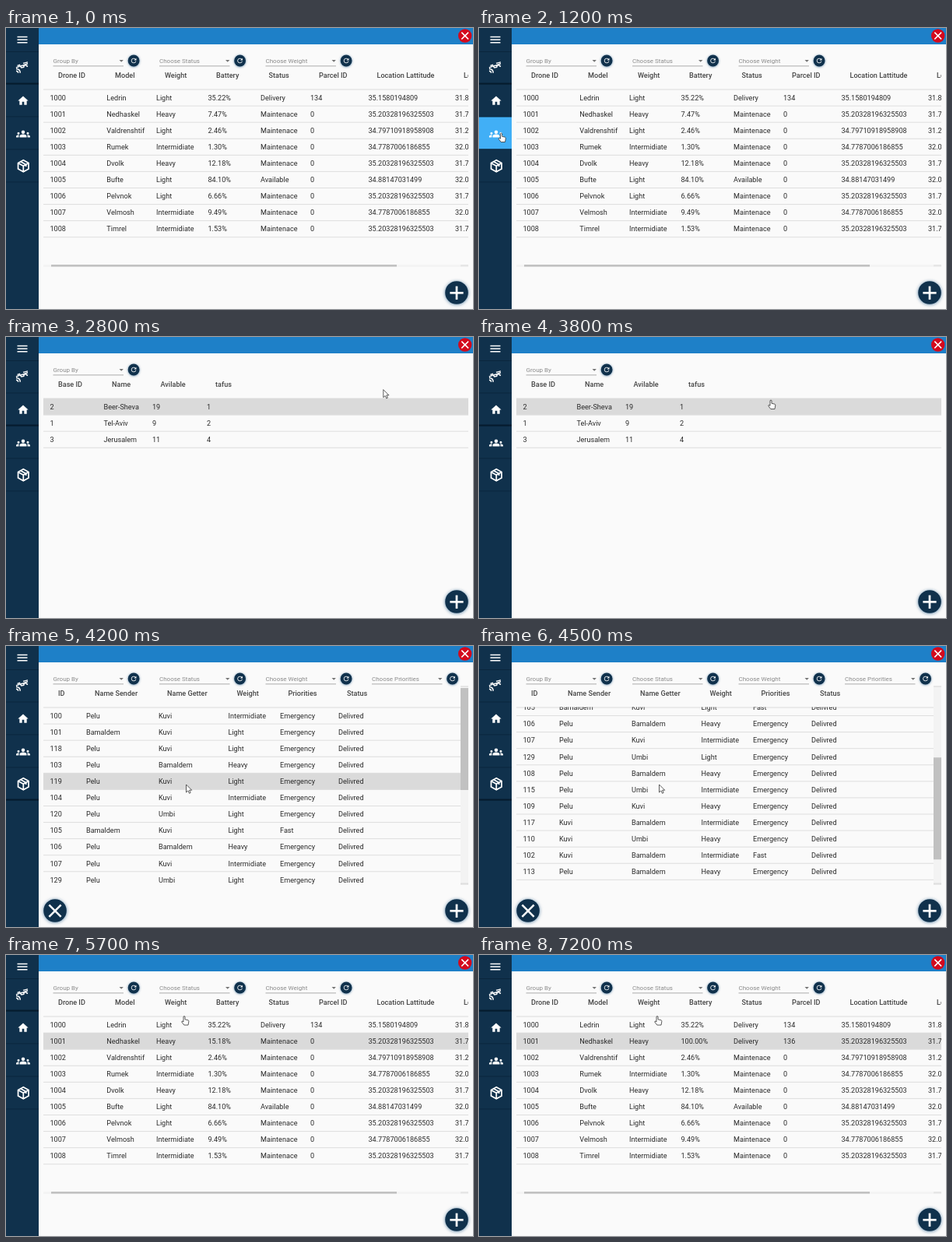
Recreate the animation shown at these times as an HTML page with a canvas. Size 600 by 361 pixels, loop 8 s.

```html
<!DOCTYPE html>
<html lang="en">
<head>
<meta charset="utf-8">
<title>Drone delivery console</title>
<style>
  html, body { margin: 0; width: 100%; height: 100%; overflow: hidden; background: #fafafa; }
  canvas { display: block; width: 100vw; height: 100vh; }
</style>
</head>
<body>
<canvas id="stage"></canvas>
<script>
const W = 600, H = 361, LOOP = 8000, TICK = 100;
const NAVY = '#10314c', BLUE = '#1e80c8', HOVER = '#41aff6', PAPER = '#fafafa';
const ROW_TOP = 79, ROW_H = 21.08;

const canvas = document.getElementById('stage');
const scale = window.devicePixelRatio || 1;
canvas.width = W * scale;
canvas.height = H * scale;
const ctx = canvas.getContext('2d');

const table = text => text.trim().split('\n').map(line => line.trim().split(/\s+/));

const pages = {
  drones: {
    item: 0, right: 594,
    filters: ['Group By', 'Choose Status', 'Choose Weight'],
    heads: ['Drone ID', 'Model', 'Weight', 'Battery', 'Status', 'Parcel ID', 'Location Lattitude', 'Location'],
    headX: [67, 140, 204, 270, 337.5, 402, 476.5, 588],
    cellX: [56.5, 129.3, 193, 259.5, 327, 391, 465.5, 577],
    rows: table(`
      1000 Ledrin Light 35.22% Delivery 134 35.1580194809 31.82
      1001 Nedhaskel Heavy 7.47% Maintenace 0 35.20328196325503 31.77
      1002 Valdrenshtif Light 2.46% Maintenace 0 34.79710918958908 31.25
      1003 Rumek Intermidiate 1.30% Maintenace 0 34.7787006186855 32.04
      1004 Dvolk Heavy 12.18% Maintenace 0 35.20328196325503 31.77
      1005 Bufte Light 84.10% Available 0 34.88147031499 32.01
      1006 Pelvnok Light 6.66% Maintenace 0 35.20328196325503 31.77
      1007 Velmosh Intermidiate 9.49% Maintenace 0 34.7787006186855 32.04
      1008 Timrel Intermidiate 1.53% Maintenace 0 35.20328196325503 31.77`)
  },
  bases: {
    item: 1, right: 594,
    filters: ['Group By'],
    heads: ['Base ID', 'Name', 'Avilable', 'tafus'],
    headX: [67, 136, 198.5, 269],
    cellX: [56.5, 125.5, 188, 258],
    rows: table(`
      2 Beer-Sheva 19 1
      1 Tel-Aviv 9 2
      3 Jerusalem 11 4`)
  },
  parcels: {
    item: 3, right: 584,
    filters: ['Group By', 'Choose Status', 'Choose Weight', 'Choose Priorities'],
    heads: ['ID', 'Name Sender', 'Name Getter', 'Weight', 'Priorities', 'Status'],
    headX: [67, 114, 207, 296.5, 362.5, 438],
    cellX: [56.5, 103, 196, 285.5, 352, 427],
    rows: table(`
      100 Pelu Kuvi Intermidiate Emergency Delivred
      101 Bamaldem Kuvi Light Emergency Delivred
      118 Pelu Kuvi Light Emergency Delivred
      103 Pelu Bamaldem Heavy Emergency Delivred
      119 Pelu Kuvi Light Emergency Delivred
      104 Pelu Kuvi Intermidiate Emergency Delivred
      120 Pelu Umbi Light Emergency Delivred
      105 Bamaldem Kuvi Light Fast Delivred
      106 Pelu Bamaldem Heavy Emergency Delivred
      107 Pelu Kuvi Intermidiate Emergency Delivred
      129 Pelu Umbi Light Emergency Delivred
      108 Pelu Bamaldem Heavy Emergency Delivred
      115 Pelu Umbi Intermidiate Emergency Delivred
      109 Pelu Kuvi Heavy Emergency Delivred
      117 Kuvi Bamaldem Intermidiate Emergency Delivred
      110 Kuvi Umbi Heavy Emergency Delivred
      102 Kuvi Bamaldem Intermidiate Fast Delivred
      113 Pelu Bamaldem Heavy Emergency Delivred
      135 Pelu Kuvi Intermidiate Fast Defined
      134 Pelu Bamaldem Light Emergency Colected
      136 Bamaldem Pelu Light Emergency Defined`)
  }
};

// Pointer stops: time, x, y
const pointerPath = [
  [100, 520, 4], [300, 430, 120], [500, 300, 230], [700, 150, 328], [900, 52, 230],
  [1000, 30, 185], [1200, 28.5, 135], [1400, 27, 93], [1500, 27, 93], [1800, 126.5, 96],
  [1900, 126.5, 96], [2300, 336, 190], [2400, 336, 190], [2900, 522, 37], [3400, 522, 37],
  [3800, 375, 81], [3900, 150, 150], [4000, 28, 177], [4100, 28, 177], [4200, 231.5, 178],
  [4600, 231.5, 178], [4700, 120, 110], [4800, 23, 45], [4900, 23, 45], [5100, 60, 105],
  [5200, 60, 105], [5300, 105, 42], [5500, 229, 78.5]
];

function pointerAt(t) {
  if (t < pointerPath[0][0]) return null;
  const next = pointerPath.findIndex(p => p[0] > t);
  if (next < 0) return pointerPath.at(-1).slice(1);
  const [t0, x0, y0] = pointerPath[next - 1], [t1, x1, y1] = pointerPath[next];
  const k = (t - t0) / (t1 - t0);
  return [x0 + (x1 - x0) * k, y0 + (y1 - y0) * k];
}

function pageAt(t) {
  if (t < 1500 || t >= 5000) return pages.drones;
  return t < 4100 ? pages.bases : pages.parcels;
}

function selectedRow(t, pointer) {
  if (t < 1000) return pointer ? Math.floor((pointer[1] - ROW_TOP) / ROW_H) : -1;
  if (t >= 1700 && t < 4100) return 0;
  if (t >= 4200 && t < 5000) return 4;
  return t >= 5100 ? 1 : -1;
}

// The charging drone gains power each tick, pausing on every fifth one.
function chargingRow(row, t) {
  const k = Math.floor((t - 5700) / TICK);
  if (k < 0) return row;
  const steps = Math.min(12, 1 + k - Math.floor((k + 4) / 5));
  const copy = [...row];
  copy[3] = (7.47 + 92.53 * steps / 12).toFixed(2) + '%';
  if (t >= 7200) [copy[4], copy[5]] = ['Delivery', '136'];
  return copy;
}

const icons = {
  refresh: new Path2D('M17.65 6.35C16.2 4.9 14.21 4 12 4c-4.42 0-7.99 3.58-7.99 8s3.57 8 7.99 8c3.73 0 6.84-2.55 7.73-6h-2.08c-.82 2.33-3.04 4-5.65 4-3.31 0-6-2.69-6-6s2.69-6 6-6c1.66 0 3.14.69 4.22 1.78L13 11h7V4z'),
  home: new Path2D('M10 20v-6h4v6h5v-8h3L12 3 2 12h3v8z'),
  people: new Path2D('M12 12.75c1.63 0 3.07.39 4.24.9 1.08.48 1.76 1.56 1.76 2.73V18H6v-1.61c0-1.18.68-2.26 1.76-2.73 1.17-.52 2.61-.91 4.24-.91zM4 13a2 2 0 1 0 0-4 2 2 0 0 0 0 4zm1.13 1.1C3.8 13.9 2.4 14 1.2 14.6.5 14.9 0 15.6 0 16.4V18h4.5v-1.6c0-.8.2-1.6.63-2.3zM20 13a2 2 0 1 0 0-4 2 2 0 0 0 0 4zm4 3.4c0-.8-.5-1.5-1.2-1.8-1.2-.6-2.6-.7-3.93-.5.4.7.63 1.5.63 2.3V18H24zM12 6a3 3 0 1 1 0 6 3 3 0 0 1 0-6z'),
  drone: new Path2D('M2 12L8 9.5 14 8 22 5M4 9l5-2M14 4.5l8-2M17 7l5 3M9 9l1 3 4-1 1-3M2 14q7 0 7 7M2 17.5q3.500 3.500 3.500'),
  box: new Path2D('M12 2L21 7V17L12 22 3 17V7zM3 7l9 5 9-5M12 12V22M7.500 4.500L16.500 9.500V13'),
  arrow: new Path2D('M0 0V10L2.400 7.900 4 11.300 5.600 10.500 4.100 7.200H7.200z'),
  hand: new Path2D('M-1 .6Q0-.4 1 .6V4.300L5 5.200Q6 5.600 5.800 7L5 11.500H-.2L-3.200 7.600Q-3.400 6.200-2 6.500L-1 7.300z')
};
// Signal waves under the drone
icons.drone = new Path2D('M2 12L8 9.500 14 8 22 5M4 8.500L9 7M14 4.500L22 2.500M17 7L22 10M9 9L11 12 15 11 16 8M2 14Q9 14 9 21M2 17.500Q5.500 17.500 5.500 21');

function rect(x, y, w, h, color) {
  ctx.fillStyle = color;
  ctx.fillRect(x, y, w, h);
}

function text(str, x, y, size = 9.1, color = '#2a2a2a', weight = 400) {
  ctx.font = `${weight} ${size}px Roboto, sans-serif`;
  ctx.fillStyle = color;
  ctx.fillText(str, x, y);
}

function icon(name, cx, cy, size, stroke) {
  ctx.save();
  ctx.translate(cx - size / 2, cy - size / 2);
  ctx.scale(size / 24, size / 24);
  ctx.fillStyle = ctx.strokeStyle = '#fff';
  ctx.lineWidth = stroke;
  if (stroke) ctx.stroke(icons[name]);
  else ctx.fill(icons[name]);
  ctx.restore();
}

function disc(x, y, r, color, glow = 0) {
  ctx.save();
  ctx.shadowColor = 'rgba(10, 70, 120, .65)';
  ctx.shadowBlur = glow * scale;
  ctx.shadowOffsetY = glow ? 0.5 * scale : 0;
  ctx.beginPath();
  ctx.arc(x, y, r, 0, 7);
  ctx.fillStyle = color;
  ctx.fill();
  ctx.restore();
}

function cross(x, y, arm, width, angle) {
  ctx.save();
  ctx.translate(x, y);
  ctx.rotate(angle);
  rect(-arm, -width / 2, arm * 2, width, '#fff');
  rect(-width / 2, -arm, width, arm * 2, '#fff');
  ctx.restore();
}

function drawFilter(label, i) {
  const x = 60.5 + i * 136.5;
  text(label, x, 45, 8, '#8b8b8b');
  rect(x, 48.5, 90.5, 0.8, '#979797');
  ctx.beginPath();
  ctx.moveTo(x + 85, 41);
  ctx.lineTo(x + 90.4, 41);
  ctx.lineTo(x + 87.7, 43.8);
  ctx.fillStyle = '#757575';
  ctx.fill();
  disc(x + 103.6, 42, 7.4, NAVY, 3);
  icon('refresh', x + 103.6, 42, 10);
}

function drawTable(page, t, selected, scroll) {
  ctx.save();
  ctx.beginPath();
  ctx.rect(48, 50, page.right - 48, 257);
  ctx.clip();
  page.heads.forEach((head, i) => text(head, page.headX[i], 64.3, 9.1, '#454545', 500));
  rect(48, ROW_TOP - 0.5, 546, 1, '#dedede');

  ctx.beginPath();
  ctx.rect(48, ROW_TOP - 0.5, page.right - 48, 228);
  ctx.clip();
  page.rows.forEach((row, i) => {
    const y = ROW_TOP + i * ROW_H - scroll;
    if (i === selected) rect(48, y, 546, ROW_H, '#dadada');
    rect(48, y + ROW_H - 0.5, 546, 1, '#dedede');
    const cells = page === pages.drones && i === 1 ? chargingRow(row, t) : row;
    cells.forEach((cell, c) => text(cell, page.cellX[c], y + 13.8));
  });
  ctx.restore();
}

function drawScrollbars(page, scroll) {
  if (page === pages.drones) {
    rect(48, 304, 536, 3, '#f4f4f4');
    rect(58, 304, 444, 2.6, '#c1c1c1');
    rect(584, 304, 10, 2.6, '#e6e6e6');
  } else if (page === pages.parcels) {
    rect(584, 51, 10, 256, '#f3f3f3');
    rect(584, 51, 10, 2, '#e6e6e6');
    rect(584, 304.5, 10, 2, '#dedede');
    rect(584, 54 + 119 * scroll / (ROW_H * 10), 10, 131, '#c1c1c1');
  }
}

function drawSidebar(active, pointer) {
  rect(0, 0, 42, H, NAVY);
  for (const y of [10.7, 14.3, 18]) rect(14.5, y, 13, 1.5, '#fff');
  for (let i = 0; i < 4; i++) {
    const y = 30.5 + i * 42;
    const hovered = pointer && pointer[0] < 42 && pointer[1] >= y && pointer[1] < y + 42;
    if (hovered) rect(0, y, 42, 41, HOVER);
    rect(0, y + 41, 42, 0.8, '#09243a');
    if (i === active) rect(0, y + 40, 42, 2, '#051b2d');
  }
  rect(0, 30, 42, 0.8, '#09243a');
  icon('drone', 20.5, 51, 18, 2);
  icon('home', 22, 93.5, 16);
  icon('people', 22, 136, 18);
  icon('box', 22.3, 177.3, 18, 2.3);
}

function drawPointer([x, y], isHand) {
  ctx.save();
  ctx.translate(x, y);
  ctx.fillStyle = '#fff';
  ctx.strokeStyle = '#333';
  ctx.lineWidth = 0.8;
  const shape = isHand ? icons.hand : icons.arrow;
  ctx.fill(shape);
  ctx.stroke(shape);
  ctx.restore();
}

function draw(t) {
  const page = pageAt(t);
  const pointer = pointerAt(t);
  const scroll = ROW_H * 10 * Math.min(1, Math.max(0, (t - 4200) / 400));

  ctx.setTransform(scale, 0, 0, scale, 0, 0);
  rect(0, 0, W, H, PAPER);
  rect(42, 0, W - 42, 21, BLUE);
  page.filters.forEach(drawFilter);
  drawTable(page, t, selectedRow(t, pointer), page === pages.parcels ? scroll : 0);
  drawScrollbars(page, scroll);
  drawSidebar(page.item, pointer);

  disc(589.7, 10, 8.7, '#d3091d');
  cross(589.7, 10, 6.2, 1.5, Math.PI / 4);
  disc(579, 340, 14.8, NAVY, 4);
  cross(579, 340.3, 8.6, 2.7, 0);
  if (page === pages.parcels) {
    disc(63, 340, 14.8, NAVY, 4);
    cross(63, 340.3, 10.8, 2.5, Math.PI / 4);
  }
  if (pointer) {
    const isHand = pointer[0] < 42 || (t >= 3500 && t < 4000) || t >= 5300;
    drawPointer(pointer, isHand);
  }
}

function frame() {
  const t = performance.now() % LOOP;
  draw(Math.floor(t / TICK) * TICK);
  requestAnimationFrame(frame);
}
frame();
</script>
</body>
</html>
```
